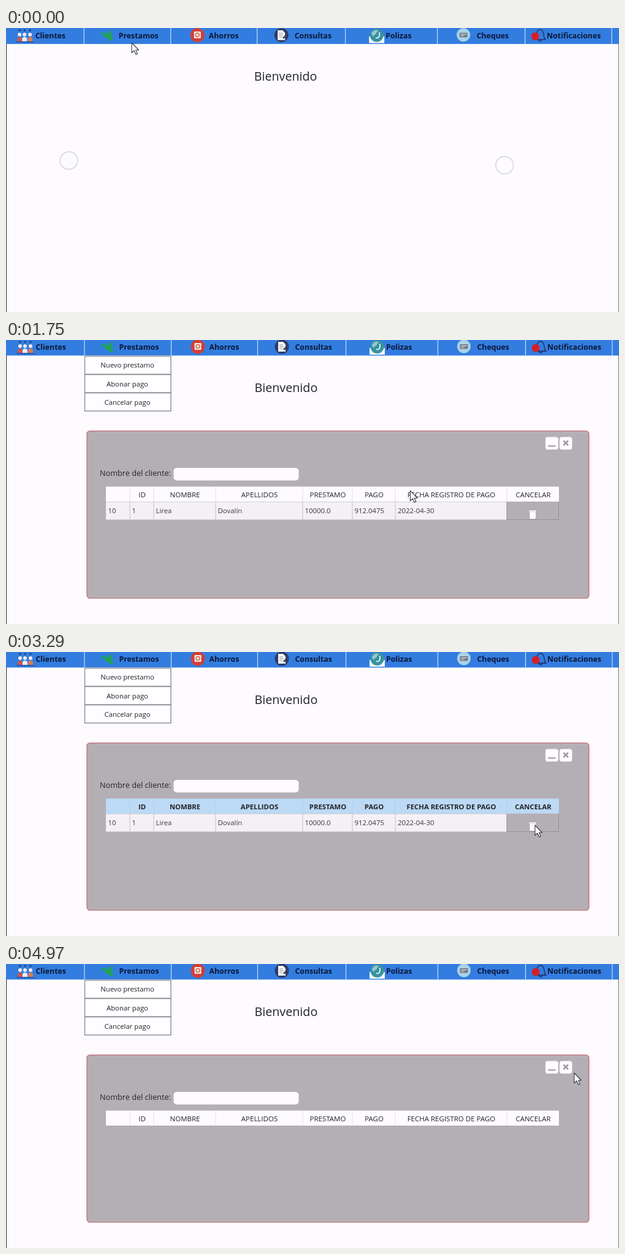
Animation, 1000 px wide and 464 px high, one loop 5.04 s. Source, as an HTML page:

```html
<!DOCTYPE html>
<html lang="es">
<head>
<meta charset="utf-8">
<title>Prestamos</title>
<style>
html, body { margin: 0; width: 100%; height: 100%; overflow: hidden; background: #fdfbfe; }
svg { display: block; width: 100vw; height: 100vh; font-family: "Open Sans", "Noto Sans", sans-serif; fill: #242328; }
</style>
</head>
<body>
<svg id="stage" viewBox="0 0 1000 464"></svg>
<script>
const stage = document.getElementById("stage");
const LOOP = 5040, STEP = 70;

const rect = (x, y, w, h, fill, more = "") =>
  `<rect x="${x}" y="${y}" width="${w}" height="${h}" fill="${fill}" ${more}/>`;
const disc = (x, y, r, fill, more = "") =>
  `<circle cx="${x}" cy="${y}" r="${r}" fill="${fill}" ${more}/>`;
const path = (d, fill, more = "") => `<path d="${d}" fill="${fill}" ${more}/>`;
const text = (x, y, size, str, more = "") =>
  `<text x="${x}" y="${y}" font-size="${size}" ${more}>${str}</text>`;
const group = (id, body) => `<g id="${id}">${body}</g>`;
const MID = 'text-anchor="middle"';

function person(x, y, shirt) {
  return disc(x, y - 8, 1.6, "#23345f") + disc(x, y - 1, 3, "#f3e9ea") +
    path(`M${x - 4} ${y + 10}v-3q0-4 4-4t4 4v3z`, shirt);
}

function icons() {
  return person(23, 11, "#c8584c") + person(31, 11, "#e9eef8") + person(40, 11, "#dc7c55") +
    path("M17 22h29", "none", 'stroke="#293b70"') +
    path("M155 6l7 1 4 3 3-5 6-1-3 6 4 2-3 3 2 4-5 1-5-5-5-2z", "#22a455") +
    disc(313, 11, 11.5, "#cf3f38") + rect(307.5, 5, 11, 11, "#fbeeea", 'rx="1"') +
    disc(313, 10.5, 3, "none", 'stroke="#cf5a45" stroke-width="1.5"') +
    disc(450, 11, 11.5, "#2f3c63") + path("M444 3h8l4 4v12h-12z", "#f6f5fa") +
    path("M446 8h6m-6 3h7m-7 3h5", "none", 'stroke="#8e93a8"') +
    path("M452 15l6-6 2 2-6 6z", "#3c4054") +
    rect(593, 13, 25, 11, "#eef4f8") + disc(605.5, 11, 11, "#38929f") +
    path("M597 8q4-7 11-5l-4 6-5 4z", "#8fc9d4") +
    path("M604 15q4 2 6-3V6", "none", 'stroke="#e7f5f5" stroke-width="1.8"') +
    disc(747, 10.5, 11, "#a6d3e8") + rect(740.5, 7, 13, 7.5, "#747b89", 'rx="1"') +
    path("M742.5 9.5h9m-9 2.5h5", "none", 'stroke="#e9edf0"') +
    path("M862 18q4-3 4-9 1-6 5-7 6 0 7 8 0 5 3 8zM869 19q3 4 6 0", "none", 'stroke="#222a55" stroke-width="1.3"') +
    disc(864, 13, 6.5, "#d71f2b");
}

function toolbar() {
  const labels = [[48.5, "Clientes"], [184.5, "Prestamos"], [331.5, "Ahorros"], [471.5, "Consultas"],
    [620, "Polizas"], [768.5, "Cheques"], [883, "Notificaciones"]];
  return rect(-2, -3, 1004, 28.4, "#337de0") +
    [128, 269.5, 410.5, 554.5, 704.5, 847.5, 989].map(x => rect(x - .6, -3, 1.2, 28.4, "#c4dcf8")).join("") +
    icons() +
    labels.map(([x, s]) => text(x, 16, 12.3, s, 'font-weight="700" fill="#0c1836"')).join("") +
    text(405.5, 85, 19.7, "Bienvenido");
}

function menu() {
  return ["Nuevo prestamo", "Abonar pago", "Cancelar pago"].map((s, i) =>
    rect(128.5, 26.5 + i * 30, 140.5, 29.5, "#fefdff", 'stroke="#969399" stroke-width="1.5"') +
    text(198, 45.4 + i * 30.2, 11.3, s, MID)).join("");
}

const EDGES = [163, 202, 241, 342, 484, 565, 635, 817, 902];
const HEADS = ["", "ID", "NOMBRE", "APELLIDOS", "PRESTAMO", "PAGO", "FECHA REGISTRO DE PAGO", "CANCELAR"];
const CELLS = ["10", "1", "Lirea", "Dovalín", "10000.0", "912.0475", "2022-04-30"];

const dividers = (y, h, fill, to = 8) =>
  EDGES.slice(1, to).map(x => rect(x - .5, y, 1, h, fill)).join("");

function header(id, fill, line, size, weight) {
  return group(id, rect(163, 239.5, 739, 24.5, fill) + dividers(239.5, 24.5, line) +
    HEADS.map((s, i) => text((EDGES[i] + EDGES[i + 1]) / 2 + .5, 256.6, size, s,
      `${MID} font-weight="${weight}"`)).join(""));
}

function panel() {
  const trash = rect(854.5, 281, 9.5, 11, "#fdfbfe", 'rx="1"') + rect(853.5, 278.5, 11.5, 2, "#fdfbfe");
  return rect(132, 148.5, 819, 273.5, "#b4afb5", 'id="box" rx="5" stroke="#cf5f6d" stroke-width="1.2"') +
    rect(880, 158.5, 21, 20.5, "#fdfbfe", 'rx="4"') + rect(884.5, 172, 12, 2.5, "#aaa5ab") +
    rect(903, 158.5, 20.5, 20.5, "#fdfbfe", 'rx="4"') +
    path("M909.5 164.5l7.5 7.5m0-7.5l-7.5 7.5", "none", 'id="cross" stroke="#9f9aa1" stroke-width="2.5"') +
    text(153, 222, 12.7, "Nombre del cliente:") +
    rect(273.5, 209, 204, 20.5, "#fdfbfe", 'rx="5"') +
    header("plain", "#fdfbfe", "#e6e2e8", 11.5, 400) +
    header("lit", "#bcd9f5", "#b2d0ee", 11.3, 700) +
    group("row",
      group("white", rect(163, 264.5, 654, 29, "#f4f1f5") + dividers(264.5, 29, "#c3bec5", 7) +
        path("M817 264.5v29h84.5v-29", "none", 'stroke="#96919a"')) +
      group("blue", rect(163, 264, 654, 30, "#0675d0") + dividers(264, 30, "#5fa3dd", 7) +
        rect(637, 265.5, 179, 27.5, "none", 'stroke="#6e91c0" stroke-width="1.3"') +
        path("M817.5 264v30h84v-30", "none", 'stroke="#9791a5"') +
        path("M817 268v-4h4M817 290v4h4M898 294h4v-4", "none", 'stroke="#2c7fca" stroke-width="1.5"')) +
      group("cells", CELLS.map((s, i) =>
        text(EDGES[i] + (i == 6 ? 4 : 3.5), 283.4, 11.4, s)).join("")) +
      trash + path("M857 284l4.5 4.5m0-4.5l-4.5 4.5", "none", 'id="mark" stroke="#aaa5ab" stroke-width="1.3"'));
}

function dialog() {
  return rect(429, 200.5, 225, 170.5, "#337de0") + rect(433, 221.5, 217, 145.5, "#fdfbfe") +
    text(545.5, 266.6, 15, "Pago cancelado", MID) + text(545, 287, 14.8, "exitosamente", MID) +
    rect(519, 311, 42.5, 25, "#70a653", 'rx="5"') + text(530, 331, 16, "Ok");
}

const ring = (x, y) => disc(x, y, 14.3, "none", 'stroke="#d5d1e6" stroke-width="1.5"');

stage.innerHTML = rect(0, 0, 1000, 464, "#fdfbfe") +
  rect(0, 25, 1, 439, "#2b2930") + rect(999, 25, 1, 439, "#77747c") +
  group("bar", toolbar()) + group("rings", ring(102.5, 216.5) + ring(813.3, 224.2)) +
  group("menu", menu()) + group("panel", panel()) + group("dialog", dialog()) +
  group("cursor", path("M0 0V16.5L4 13l2.8 6.3 2.6-1.2L6.700 12H11.500Z", "#fdfcfe",
    'stroke="#39363f" stroke-width="1.1" stroke-linejoin="round"'));

const el = {};
stage.querySelectorAll("[id]").forEach(n => el[n.id] = n);
const show = (id, on) => el[id].setAttribute("display", on ? "inline" : "none");

// time, x, y of the pointer
const TRACK = [[0, 205, 24], [420, 206, 18], [560, 206, 19], [1050, 197.5, 107], [1330, 197.5, 107],
  [1890, 745, 272], [2100, 745, 274], [2310, 810, 295], [2730, 863, 283], [3360, 863, 283],
  [3780, 524, 313], [4200, 524, 313], [4830, 927, 178], [LOOP, 927, 178]];

function pointer(t) {
  const i = TRACK.findIndex((p, k) => k && t < p[0]);
  const [t0, x0, y0] = TRACK[i - 1], [t1, x1, y1] = TRACK[i];
  const u = (t - t0) / (t1 - t0), e = u * u * (3 - 2 * u);
  return [x0 + (x1 - x0) * e, y0 + (y1 - y0) * e];
}

function draw(ms) {
  const t = Math.floor((ms % LOOP) / STEP) * STEP;
  const between = (a, b) => t >= a && t < b;
  const fresh = between(1190, 1330), picked = between(2030, 3220), lit = between(2030, 3430);
  el.bar.setAttribute("transform", t < 70 ? "translate(-.8 .7)" : "");
  show("rings", t < 140);
  el.rings.setAttribute("opacity", t < 70 ? 1 : .4);
  show("menu", t >= 210);
  show("panel", t >= 1190);
  el.box.setAttribute("stroke", fresh ? "#d5809b" : "#cf5f6d");
  el.box.setAttribute("fill", fresh ? "#b7afb6" : "#b4afb5");
  el.cross.setAttribute("opacity", fresh ? .5 : 1);
  show("plain", !lit);
  show("lit", lit);
  show("row", t < 3430);
  show("white", !fresh && !picked);
  show("blue", picked);
  show("mark", picked);
  el.cells.setAttribute("fill", picked ? "#eef6fd" : "#3b383f");
  show("dialog", between(3430, 4200));
  el.cursor.setAttribute("transform", `translate(${pointer(t)})`);
}

const start = performance.now();
function tick() {
  draw(performance.now() - start);
  requestAnimationFrame(tick);
}
draw(0);
tick();
</script>
</body>
</html>
```
